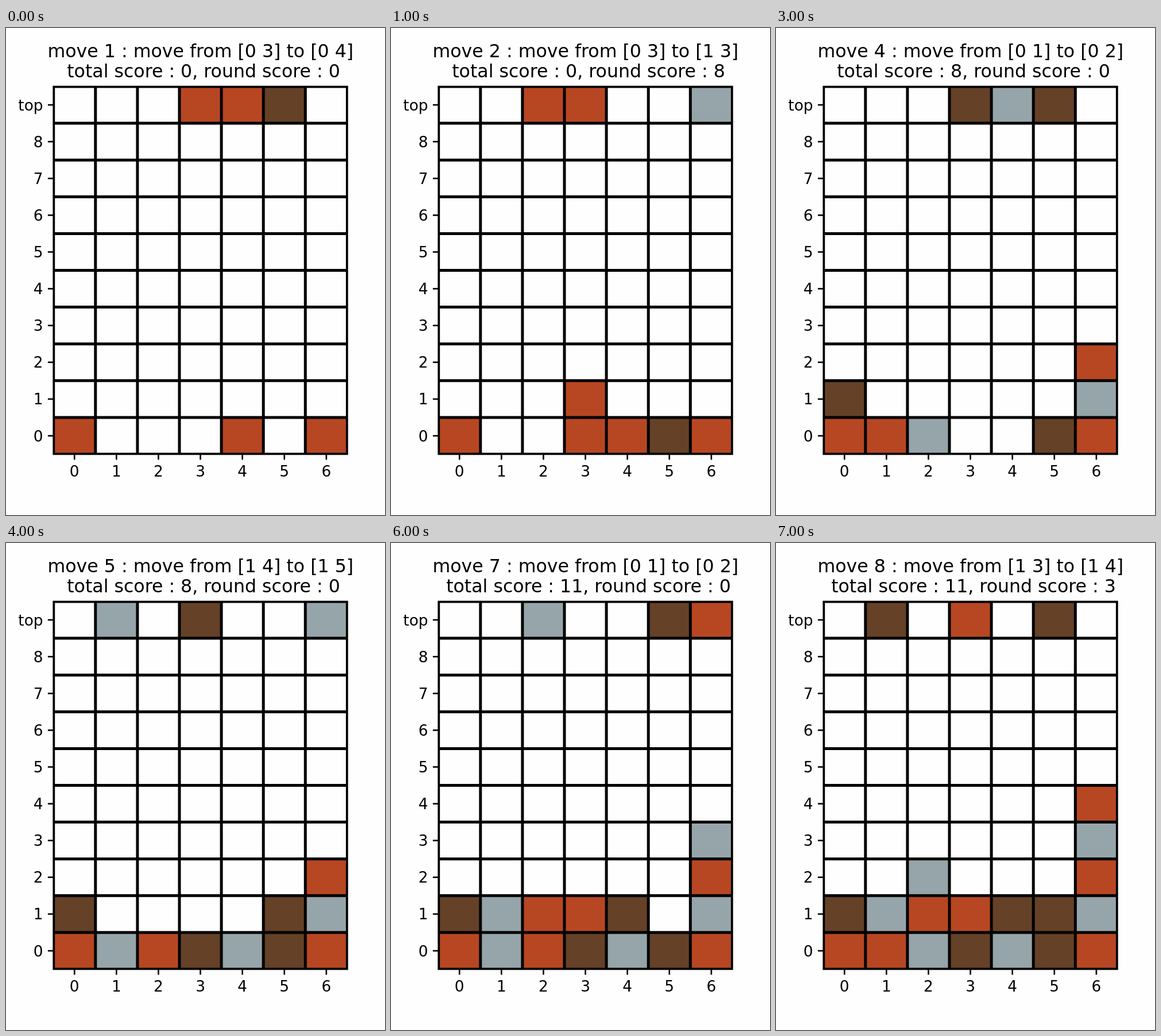
An HTML page that plays this animation: 660x849 px, repeating every 8000 ms.

```html
<!DOCTYPE html>
<html lang="en">
<head>
<meta charset="utf-8">
<title>Falling blocks</title>
<style>
  html, body { margin: 0; width: 100%; height: 100%; overflow: hidden; background: #fefefe; }
  svg { display: block; width: 660px; height: 849px; font-family: "DejaVu Sans", sans-serif; }
</style>
</head>
<body>
<svg id="stage" viewBox="0 0 660 849">
  <g id="blocks"></g>
  <g id="grid" stroke="#000"></g>
  <g id="labels" font-size="26.35"></g>
  <g font-size="31.6" text-anchor="middle">
    <text id="move" x="338.8" y="51.2"></text>
    <text id="score" x="344" y="86.4"></text>
  </g>
</svg>
<script>
const NS = "http://www.w3.org/2000/svg";
const COLS = 7, ROWS = 10, STEP = 1000;
const LEFT = 82.7, TOP = 102, CW = 73.1, CH = 64.1;
const RIGHT = LEFT + COLS * CW, BOTTOM = TOP + ROWS * CH;
const COLORS = { R: "#b74722", B: "#654127", G: "#96a5a9" };

// Each turn: swapped cells, total, round score, new row, columns from the bottom up
const turns = [
  ["0 3", "0 4", 0, 0, "...RRB.", "R,,,,R,,R"],
  ["0 3", "1 3", 0, 8, "..RR..G", "R,,,RR,R,B,R"],
  ["0 0", "1 0", 8, 0, "BRG...R", "R,,,,,B,RG"],
  ["0 1", "0 2", 8, 0, "...BGB.", "RB,R,G,,,B,RGR"],
  ["1 4", "1 5", 8, 0, ".G.B..G", "RB,G,R,B,G,BB,RGR"],
  ["1 4", "2 4", 8, 3, "..RRBB.", "RB,GG,R,BB,GB,B,RGRG"],
  ["0 1", "0 2", 11, 0, "..G..BR", "RB,GG,RR,BR,GB,B,RGRG"],
  ["1 3", "1 4", 11, 3, ".B.R.B.", "RB,RG,GRG,BR,GB,BB,RGRGR"]
];

const el = id => document.getElementById(id);

function add(parent, tag, attrs, text = "") {
  const node = document.createElementNS(NS, tag);
  for (const key in attrs) node.setAttribute(key, attrs[key]);
  node.textContent = text;
  parent.appendChild(node);
}

function line(x1, y1, x2, y2, width) {
  add(el("grid"), "line", { x1, y1, x2, y2, "stroke-width": width });
}

function drawAxes() {
  for (let c = 1; c < COLS; c++) line(LEFT + c * CW, TOP, LEFT + c * CW, BOTTOM, 5);
  for (let r = 1; r < ROWS; r++) line(LEFT, TOP + r * CH, RIGHT, TOP + r * CH, 5);
  add(el("grid"), "rect", {
    x: LEFT + 0.6, y: TOP + 0.6, width: RIGHT - LEFT - 1.2, height: BOTTOM - TOP - 1.2,
    fill: "none", "stroke-width": 3.8
  });
  for (let c = 0; c < COLS; c++) {
    const x = LEFT + (c + 0.5) * CW;
    line(x, BOTTOM, x, BOTTOM + 9.6, 2.6);
    add(el("labels"), "text", { x, y: 782, "text-anchor": "middle" }, c);
  }
  for (let r = 0; r < ROWS; r++) {
    const y = BOTTOM - (r + 0.5) * CH;
    line(LEFT - 9.8, y, LEFT, y, 2.6);
    add(el("labels"), "text", { x: 64.5, y: y + 9.6, "text-anchor": "end" },
      r === ROWS - 1 ? "top" : r);
  }
}

function block(col, row, kind) {
  if (!COLORS[kind]) return;
  add(el("blocks"), "rect", {
    x: LEFT + col * CW, y: BOTTOM - (row + 1) * CH, width: CW, height: CH, fill: COLORS[kind]
  });
}

function showTurn(i) {
  const [from, to, total, round, next, stacks] = turns[i];
  el("move").textContent = `move ${i + 1} : move from [${from}] to [${to}]`;
  el("score").textContent = `total score : ${total}, round score : ${round}`;
  el("blocks").textContent = "";
  [...next].forEach((kind, c) => block(c, ROWS - 1, kind));
  stacks.split(",").forEach((stack, c) => [...stack].forEach((kind, r) => block(c, r, kind)));
}

let shown = -1;
const start = performance.now();

function tick() {
  const i = Math.floor((performance.now() - start) / STEP) % turns.length;
  if (i !== shown) showTurn(shown = i);
  requestAnimationFrame(tick);
}

drawAxes();
tick();
</script>
</body>
</html>
```
